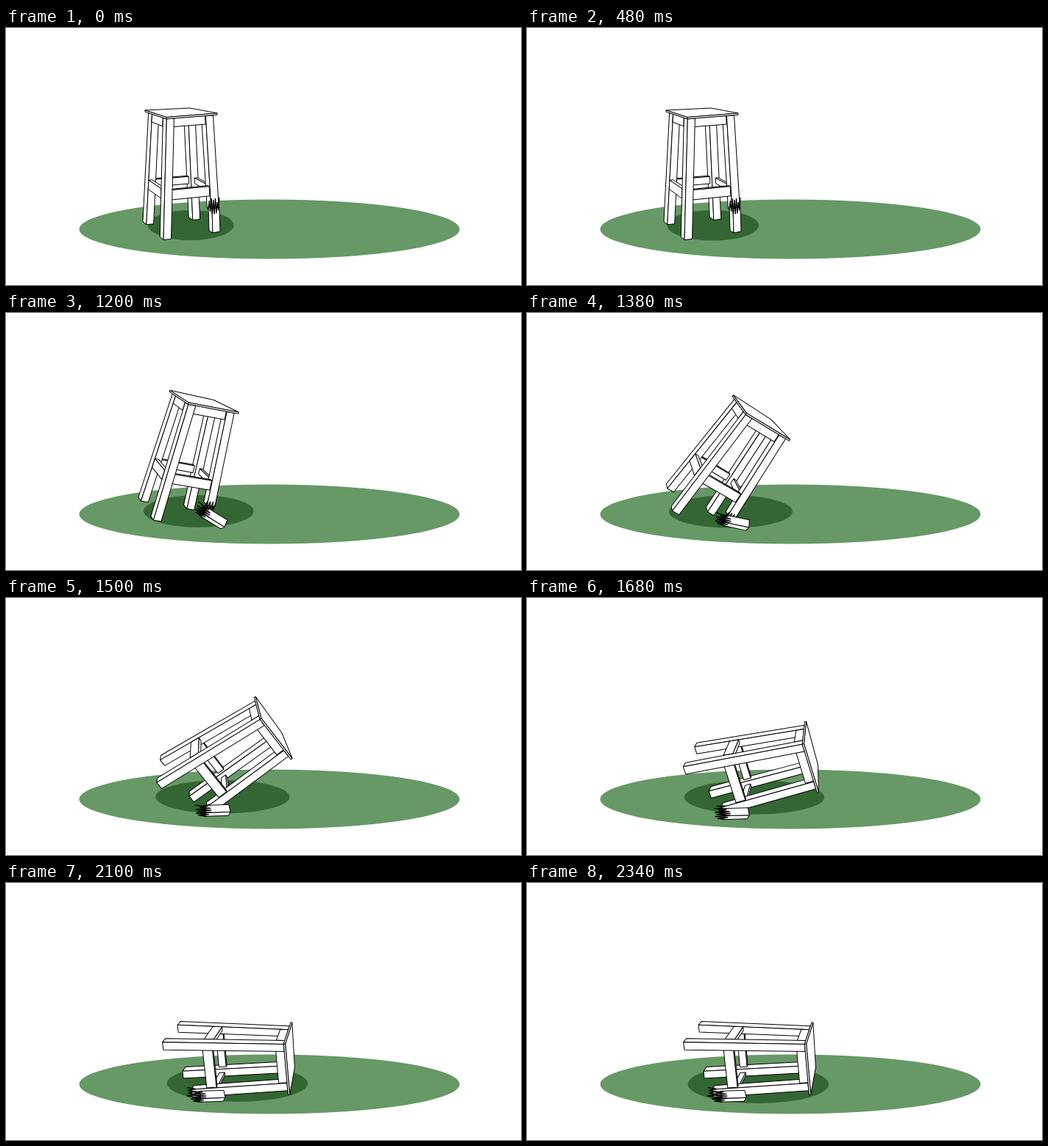
An HTML page with a canvas that plays this animation: 700 by 350 pixels, repeating every 2700 ms.

```html
<!DOCTYPE html>
<html lang="en">
<head>
<meta charset="utf-8">
<title>Falling stool</title>
<style>
  html, body { margin: 0; width: 100%; height: 100%; overflow: hidden; background: #fff; }
  canvas { display: block; width: 700px; height: 350px; }
</style>
</head>
<body>
<canvas id="stage" width="700" height="350"></canvas>
<script>
const ctx = document.getElementById('stage').getContext('2d');
const LOOP = 2700, STEP = 60, LAST = 2340;
const CRACK = 600, HIT = 1500, REST = 2160;
const HIT_TILT = 57, END_TILT = 89.5;

// Corners of the upright stool: front, right, back, left
const SEAT = [[218, 121.5], [287, 116], [250, 109], [189, 112]];
const FEET = [[214, 288.5], [291.5, 280], [258, 256.5], [186, 263.5]];
const MIDDLE = [236.6, 193];
const BREAK = 0.81;

const mix = (a, b, k) => a + (b - a) * k;
const mixPt = (a, b, k) => [mix(a[0], b[0], k), mix(a[1], b[1], k)];
const add = (a, b) => [a[0] + b[0], a[1] + b[1]];
const part = (t, from, to) => Math.min(1, Math.max(0, (t - from) / (to - from)));
const smooth = k => k * k * (3 - 2 * k);
const rad = deg => deg * Math.PI / 180;
const bezier = (a, b, c, k) => 3 * (1 - k) ** 2 * k * a + 3 * (1 - k) * k * k * b + k ** 3 * c;

// Slow start, speeding up until the seat hits, then settling
function tiltAt(t) {
  const land = 1 - (1 - part(t, HIT, REST)) ** 3.2;
  return HIT_TILT * part(t, CRACK, HIT) ** 3.25 + (END_TILT - HIT_TILT) * land;
}

function poly(pts) {
  ctx.beginPath();
  pts.forEach(p => ctx.lineTo(p[0], p[1]));
  ctx.closePath();
  ctx.fill();
  ctx.stroke();
}

function ellipse(x, y, rx, ry, fill) {
  ctx.fillStyle = fill;
  ctx.beginPath();
  ctx.ellipse(x, y, rx, ry, 0, 0, 2 * Math.PI);
  ctx.fill();
}

const area = q => q.reduce((s, p, i) => {
  const n = q[(i + 1) % q.length];
  return s + p[0] * n[1] - n[0] * p[1];
}, 0);

// Draws the faces of a box that look at the viewer
function box(at, [u0, u1], [v0, v1], [w0, w1]) {
  const faces = [
    [at(u1, v0, w0), at(u1, v1, w0), at(u1, v1, w1), at(u1, v0, w1)],
    [at(u0, v1, w0), at(u1, v1, w0), at(u1, v0, w0), at(u0, v0, w0)],
    [at(u0, v1, w0), at(u0, v0, w0), at(u0, v0, w1), at(u0, v1, w1)],
    [at(u0, v0, w0), at(u1, v0, w0), at(u1, v0, w1), at(u0, v0, w1)]
  ];
  faces.filter(f => area(f) > 0).forEach(poly);
}

// Jagged black line across a-c, reaching up and down by random amounts
function splinters(a, c, up, down, n, seed) {
  ctx.lineWidth = 1.3;
  ctx.beginPath();
  for (let i = 0; i <= n; i++) {
    const s = Math.sin(i * 12.9 + seed) * 437.5;
    const reach = 0.4 + 0.6 * (s - Math.floor(s));
    const [x, y] = mixPt(a, c, i / n);
    ctx.lineTo(x, y + reach * (i % 2 ? -up : down));
  }
  ctx.stroke();
  ctx.lineWidth = 1;
}

// Corner-based space: u to the right, v to the back, w downwards
const quad = ([f, r, b, l], u, v) => mixPt(mixPt(f, r, u), mixPt(l, b, u), v);
const seatAt = (u, v, w) => mixPt(quad(SEAT, u, v), quad(FEET, u, v), w);

// The frame is inset below the seat; legs narrow slightly downwards
function frameAt(u, v, w) {
  const k = mix(1, 0.85, w);
  const pinch = x => x < 0.5 ? x * k : 1 - (1 - x) * k;
  const pu = pinch(u), pv = pinch(v);
  return mixPt(quad(SEAT, 0.04 + 0.92 * pu, 0.08 + 0.84 * pv), quad(FEET, pu, pv), w);
}

function drawStool(tilt) {
  const lean = tilt / END_TILT;
  const nearU = [0, 0.16], midU = [0.16, 0.84], farU = [0.84, 1];
  const nearV = [0, 0.2], midV = [0.2, 0.8], farV = [0.8, 1];
  const leg = (u, v, end = 1) => box(frameAt, u, v, [0.02, end]);
  const rails = (u, v, top, bottom) => {
    box(frameAt, u, v, [0.02, 0.09]);
    box(frameAt, u, v, [top, bottom]);
  };

  ctx.save();
  ctx.translate(MIDDLE[0] + bezier(11.3, 88.8, 71.7, lean), MIDDLE[1] + bezier(1.7, 29.8, 45.4, lean));
  ctx.rotate(rad(tilt));
  ctx.translate(-MIDDLE[0], -MIDDLE[1]);
  ctx.fillStyle = '#fff';
  leg(farU, farV);
  rails(midU, [0.9, 0.97], 0.615, 0.68);
  rails([0.92, 0.98], midV, 0.62, 0.67);
  leg(nearU, farV);
  leg(farU, nearV, BREAK);
  rails([0, 0.08], midV, 0.605, 0.685);
  rails(midU, [0.03, 0.1], 0.605, 0.685);
  leg(nearU, nearV);
  box(seatAt, [0, 1], [0, 1], [0, 0.014]);
  const size = Math.min(1, 0.4 + 4 * lean);
  splinters(frameAt(0.84, 0.1, BREAK), frameAt(1, 0, BREAK), 6 * size, 9 * size, 7, 3);
  ctx.restore();
}

// The broken foot swings out flat, then slides back with a small bump
function drawStump(t) {
  const fall = part(t, CRACK, HIT), slide = part(t, HIT, 1920);
  const top = [-1, -33], thin = [-5, -3], wide = [10, -2], foot = [0, 0];
  const a = add(top, thin), c = add(top, wide);

  ctx.save();
  ctx.translate(
    281 + 24 * fall - 7 * smooth(slide),
    279 + 13 * Math.sin(fall * 0.6 * Math.PI) + 4 * Math.sin(slide * Math.PI) + slide
  );
  ctx.rotate(rad(-90 * fall ** 1.15));
  ctx.fillStyle = '#fff';
  poly([a, top, foot, thin]);
  poly([top, c, wide, foot]);
  splinters(a, c, 14, 10, 11, 1);
  ctx.restore();
}

function drawShadow(t, tilt) {
  const lean = tilt / END_TILT, creep = Math.min(t, 1080) / 1000;
  const x = 251.3 + 2.8 * creep + 30 * (lean + smooth(lean));
  const rx = 58.3 + 8.3 * creep + 28.5 * Math.sin(rad(tilt));
  const top = 248, bottom = 289 + 11 * (t / LAST) ** 2;
  ellipse(x, (top + bottom) / 2, rx, (bottom - top) / 2, '#336633');
}

function draw(t) {
  const tilt = tiltAt(t);
  ctx.fillStyle = '#fff';
  ctx.fillRect(0, 0, 700, 350);
  ellipse(358, 274, 258.5, 40.5, '#669966');
  drawShadow(t, tilt);
  ctx.strokeStyle = '#000';
  ctx.lineWidth = 1;
  ctx.lineJoin = 'bevel';
  drawStool(tilt);
  drawStump(t);
}

function tick() {
  const t = performance.now() % LOOP;
  draw(Math.min(LAST, Math.floor(t / STEP) * STEP));
  requestAnimationFrame(tick);
}
tick();
</script>
</body>
</html>
```
